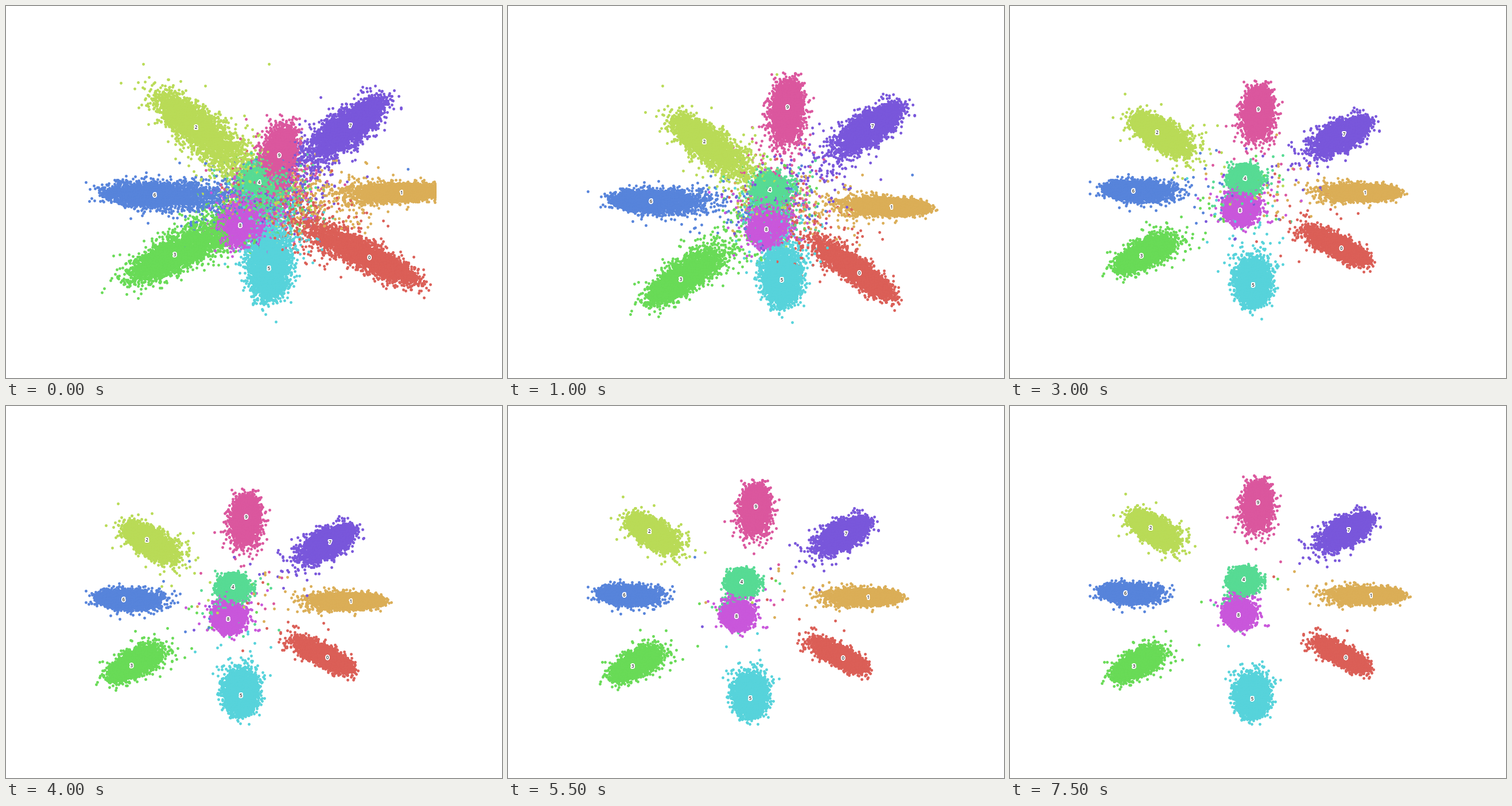
An HTML page with a canvas that plays this animation: 864 px wide and 648 px high, repeating every 8 s.

```html
<!DOCTYPE html>
<html lang="en">
<head>
<meta charset="utf-8">
<title>Digit clusters</title>
<style>
  html, body { margin: 0; width: 100%; height: 100%; overflow: hidden; background: #fff; }
  canvas { display: block; }
</style>
</head>
<body>
<canvas id="stage" width="864" height="648"></canvas>
<script>
const LOOP = 8000, STEP = 500, POINTS = 3400, DOT = 2.45;
const MIDDLE = [412, 332];
const ctx = document.getElementById('stage').getContext('2d');

// Each digit drifts through four label positions, one per second, and then rests.
// length, width: size of the dense part at rest; growth: how much longer it starts.
const clusters = [
  { path: [[633, 438], [612, 465], [583, 421], [585, 438]], length: 105, width: 17, growth: 2.25 },
  { path: [[689, 325], [668, 350], [595, 313], [629, 330]], length: 132, width: 15, growth: 1.35 },
  { path: [[331, 211], [342, 236], [283, 198], [245, 212]], length: 102, width: 23, growth: 2.3 },
  { path: [[294, 433], [301, 476], [259, 435], [216, 453]], length: 101, width: 22, growth: 2.3 },
  { path: [[441, 307], [456, 320], [420, 286], [407, 302]], length: 46, width: 26, growth: 1.7 },
  { path: [[458, 457], [477, 477], [435, 485], [422, 510]], length: 81, width: 31, growth: 1.75 },
  { path: [[259, 329], [249, 340], [223, 308], [201, 326]], length: 106, width: 17, growth: 2.1 },
  { path: [[600, 208], [635, 209], [598, 194], [590, 216]], length: 105, width: 24, growth: 1.75 },
  { path: [[408, 382], [450, 389], [420, 350], [398, 364]], length: 54, width: 27, growth: 1.75 },
  { path: [[476, 260], [487, 176], [445, 168], [432, 168]], length: 89, width: 26, growth: 1.55 }
];

// The view rescales as the outliers move: scale x, scale y, shift x, shift y.
const viewTimes = [2000, 3000, 4000, 5500, 7500];
const views = [[1, 1, 0, 0], [.944, .895, 2, -5], [.925, .909, -12, 10], [.993, .977, 0, 3], [1, 1, 0, 0]];

let seed = 71;
function random() {
  seed = seed + 0x6D2B79F5 | 0;
  let n = Math.imul(seed ^ seed >>> 15, 1 | seed);
  n = n + Math.imul(n ^ n >>> 7, 61 | n) ^ n;
  return ((n ^ n >>> 14) >>> 0) / 4294967296;
}

function gauss() {
  return Math.sqrt(-2 * Math.log(1 - random())) * Math.cos(2 * Math.PI * random());
}

const clamp = (v, lo, hi) => Math.max(lo, Math.min(hi, v));

function sample(times, values, t) {
  const last = times.length - 1;
  let i = 0;
  while (i < last - 1 && times[i + 1] <= t) i++;
  const f = clamp((t - times[i]) / (times[i + 1] - times[i]), 0, 1);
  return values[i].map((v, k) => v + (values[i + 1][k] - v) * f);
}

function makeDot(color) {
  const c = document.createElement('canvas');
  c.width = c.height = 5;
  const g = c.getContext('2d');
  g.fillStyle = color;
  g.arc(2.5, 2.5, DOT, 0, 2 * Math.PI);
  g.fill();
  return c;
}

// A few points of every cluster lie further out than the rest.
function makePoint() {
  const spread = random() < .03 ? 1.55 : 1;
  return { u: gauss() * spread, v: gauss() * spread, rank: random(), reach: random() };
}

clusters.forEach((c, digit) => {
  c.dot = makeDot(`hsl(${3.6 + 36 * digit}, 65%, 60%)`);
  c.points = Array.from({ length: POINTS }, makePoint);
});

function stamp(dot, x, y) {
  ctx.drawImage(dot, Math.round(clamp(x, 139, 747) - 2.5), Math.round(clamp(y, 101, 554) - 2.5));
}

function place(c, t) {
  const at = sample([0, 1000, 2000, 3000], c.path, t);
  const view = sample(viewTimes, views, t);
  c.at = at.map((v, k) => MIDDLE[k] + (v - MIDDLE[k]) * view[k] + view[k + 2]);
}

// Petals point away from the hub and shrink as the digits separate.
function shape(c, hub, t) {
  const extra = (c.growth - 1) * Math.exp(-t / 1700);
  const length = c.length * (1 + extra);
  const angle = Math.atan2((c.at[1] - hub[1]) * .85, c.at[0] - hub[0]);
  c.outer = length * .43;
  c.inner = length * .57;
  c.half = c.width * (1 + extra * .45);
  c.cos = Math.cos(angle);
  c.sin = Math.sin(angle);
}

function drawPoint(c, p, stray, hub) {
  const [x, y] = c.at;
  if (p.rank < stray) {
    const f = .25 + .9 * p.reach;
    stamp(c.dot, x + (hub[0] - x) * f + p.u * 36, y + (hub[1] - y) * f + p.v * 30);
    return;
  }
  const s = p.u > 0 ? p.u / (2 + .25 * p.u) : p.u / 2.4;
  const along = s * (p.u > 0 ? c.outer : c.inner);
  const across = p.v / 2.4 * c.half * Math.exp(-.2 * s);
  stamp(c.dot, x + along * c.cos - across * c.sin, y + along * c.sin + across * c.cos);
}

function drawLabel(text, [x, y]) {
  ctx.strokeText(text, x, y + 3);
  ctx.fillText(text, x, y + 3);
}

function draw(t) {
  ctx.fillStyle = '#fff';
  ctx.fillRect(0, 0, 864, 648);
  for (const c of clusters) place(c, t);
  const hub = [0, 1].map(k => clusters.reduce((sum, c) => sum + c.at[k], 0) / clusters.length);
  for (const c of clusters) shape(c, hub, t);

  // Clusters take turns so that overlapping colours mix.
  const stray = .085 * Math.exp(-t / 1300);
  for (let i = 0; i < POINTS; i++)
    for (const c of clusters) drawPoint(c, c.points[i], stray, hub);

  ctx.font = '600 8px "Open Sans", "Noto Sans", sans-serif';
  ctx.textAlign = 'center';
  ctx.lineJoin = 'round';
  ctx.lineWidth = 4;
  ctx.strokeStyle = '#fff';
  ctx.fillStyle = '#333';
  clusters.forEach((c, digit) => drawLabel(String(digit), c.at));
}

let shown = -1;
const start = performance.now();
function tick() {
  const t = Math.floor((performance.now() - start) % LOOP / STEP) * STEP;
  if (t !== shown) draw(shown = t);
  requestAnimationFrame(tick);
}
tick();
</script>
</body>
</html>
```
